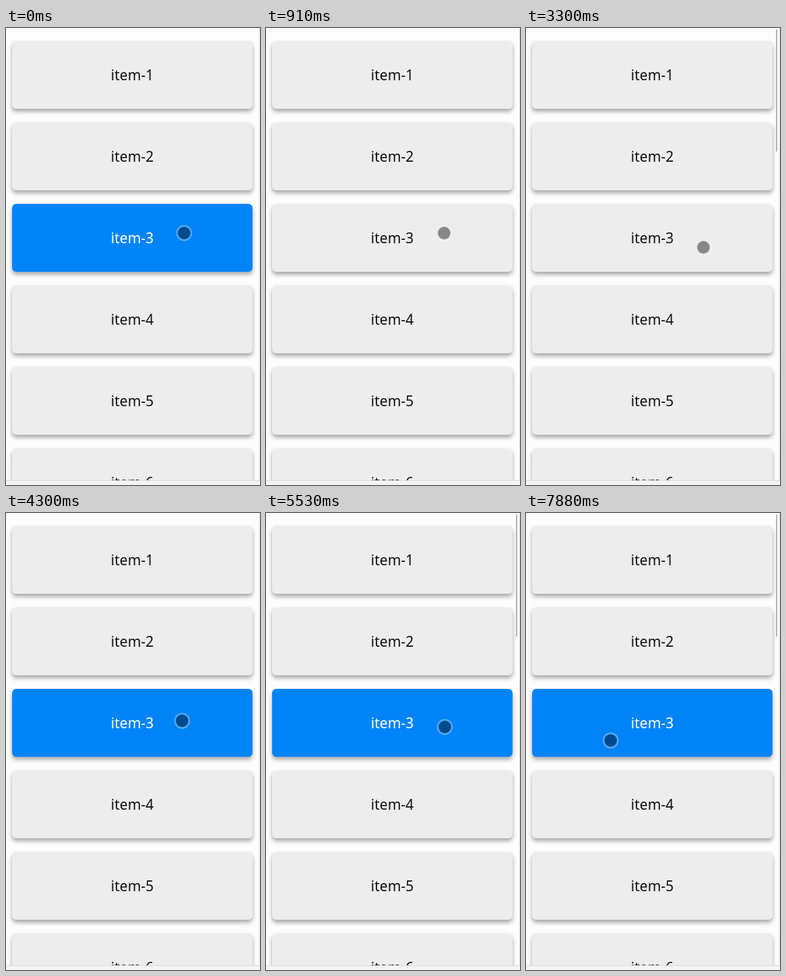
An HTML page that plays this animation: 375 px wide and 673 px high, repeating every 8000 ms.

```html
<!DOCTYPE html>
<html lang="en">
<head>
<meta charset="utf-8">
<title>Touch list</title>
<style>
  html, body { margin: 0; width: 100%; height: 100%; overflow: hidden; background: #fdfdfd; }
  .stage { position: relative; width: 375px; height: 673px; overflow: hidden; background: #fdfdfd; }
  .list { position: absolute; inset: 0 0 7px; box-sizing: border-box; padding: 19px 10px 0 9px; border-right: 1px solid #dedede; overflow: hidden; }
  .item {
    height: 100px; margin-bottom: 20px; border-radius: 6px;
    background: #ededed; color: #111;
    box-shadow: 0 4px 6px rgba(0, 0, 0, .35);
    font: 21px/100px "Noto Sans", "Open Sans", sans-serif; text-align: center;
  }
  .footer { position: absolute; left: 0; right: 0; bottom: 0; height: 6px; border-top: 1px solid #dcdcdc; background: #f4f4f4; border-bottom-left-radius: 6px; }
  .bar { position: absolute; left: 369px; top: 2px; width: 2px; height: 180px; border-radius: 1px; background: #b2b2b2; }
  .touch {
    position: absolute; left: -11.5px; top: -11.5px; width: 23px; height: 23px;
    box-sizing: border-box; border: 2px solid rgba(255, 255, 255, .4); border-radius: 50%;
    background: rgba(0, 0, 0, .43) padding-box;
  }
  .active, .bar, .touch { animation: 8s step-end infinite; }
  .active { animation-name: press; }
  .bar { animation-name: fade; }
  .touch { animation-name: drag; }

  @keyframes press {
    0%, 6.25%, 23.125%, 53.75%, 69.125%, 100% { background: #0084f8; color: #fff; }
    1.625%, 11.375%, 41.25%, 60.625% { background: #ededed; color: #111; }
  }
  @keyframes fade {
    0%, 53.75%, 74.75% { opacity: 0; }
    41.25%, 60.625%, 76.25%, 100% { opacity: 1; }
    50.75%, 71% { opacity: .66; }
    52.25%, 72.875% { opacity: .33; }
  }
  @keyframes drag {
    0% { transform: translate(262.5px, 301.5px); }
    36% { transform: translate(262.5px, 303.5px); }
    39.375% { transform: translate(262.5px, 308.5px); }
    /* first pull down */
    41.25% { transform: translate(261.5px, 322.5px); }
    42.75% { transform: translate(260.5px, 341.5px); }
    44.25% { transform: translate(260.5px, 353.5px); }
    46.125% { transform: translate(260.5px, 358.5px); }
    50.75% { transform: translate(260.5px, 347.5px); }
    52.25% { transform: translate(259.5px, 320.5px); }
    53.75% { transform: translate(259.5px, 305.5px); }
    /* second pull down */
    58.75% { transform: translate(259.5px, 310.5px); }
    60.625% { transform: translate(259.5px, 336.5px); }
    62.25% { transform: translate(259.5px, 360.5px); }
    64.125% { transform: translate(259.5px, 364.5px); }
    65.875% { transform: translate(261.5px, 346.5px); }
    67.5% { transform: translate(263.5px, 322.5px); }
    69.125% { transform: translate(263.5px, 314.5px); }
    /* sideways swipes */
    74.75% { transform: translate(255.5px, 314.5px); }
    76.25% { transform: translate(190.5px, 312.5px); }
    77.875% { transform: translate(137.5px, 311.5px); }
    79.75% { transform: translate(135.5px, 311.5px); }
    81.625% { transform: translate(188.5px, 312.5px); }
    83.25% { transform: translate(251.5px, 312.5px); }
    85.125% { transform: translate(277.5px, 312.5px); }
    86.75% { transform: translate(284.5px, 312.5px); }
    88.5% { transform: translate(253.5px, 312.5px); }
    90.375% { transform: translate(180.5px, 313.5px); }
    91.875% { transform: translate(124.5px, 314.5px); }
    98.5%, 100% { transform: translate(124.5px, 334.5px); }
  }
</style>
</head>
<body>
<div class="stage">
  <div class="list">
    <div class="item">item-1</div>
    <div class="item">item-2</div>
    <div class="item active">item-3</div>
    <div class="item">item-4</div>
    <div class="item">item-5</div>
    <div class="item">item-6</div>
  </div>
  <div class="footer"></div>
  <div class="bar"></div>
  <div class="touch"></div>
</div>
</body>
</html>
```
